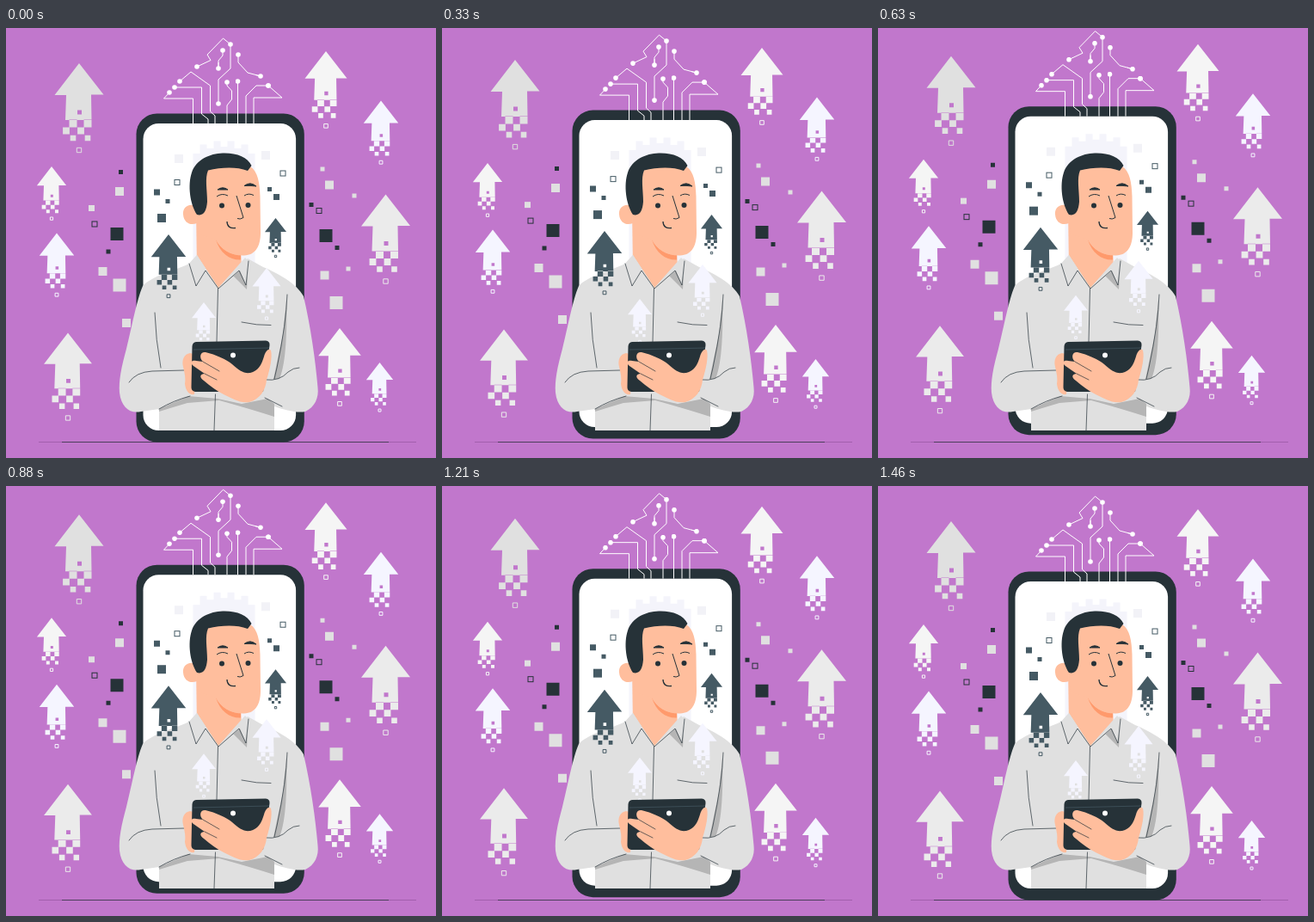
Recreate the animation shown at these times as an HTML page. Size 500 px wide and 500 px high, loop 1.5 s.

```html
<!DOCTYPE html>
<html lang="en">
<head>
<meta charset="utf-8">
<title>Rising arrows</title>
<style>
html, body { margin: 0; width: 100%; height: 100%; overflow: hidden; background: #c177cc; }
svg { display: block; width: 100vw; height: 100vh; }
.thin { fill: none; stroke: #263238; stroke-width: .7; stroke-linecap: round; stroke-linejoin: round; }
.wire { fill: none; stroke: #fff; stroke-linejoin: round; }
.wire path { marker-start: url(#dot); }
.squares { fill: none; stroke-linecap: square; }
.light { stroke: #e0e0e0; }
.dark { stroke: #263238; }
.slate { stroke: #455a64; }
/* zero-length strokes with square caps: the width is the side */
.s5 { stroke-width: 5; }
.s7 { stroke-width: 7; }
.s10 { stroke-width: 10; }
.s15 { stroke-width: 15; }
</style>
</head>
<body>
<svg viewBox="0 0 500 500">
  <defs>
    <marker id="dot" markerUnits="userSpaceOnUse" markerWidth="6" markerHeight="6" refX="3" refY="3">
      <circle cx="3" cy="3" r="2.800" fill="#fff"/>
    </marker>
    <rect id="hollow" x="-3" y="-3" width="6" height="6"/>
    <g id="arrow">
      <path id="arrowShape" fill="currentColor" fill-rule="evenodd"/>
      <rect x="-2.700" y="98.300" width="5.400" height="5.400" fill="none" stroke="currentColor" vector-effect="non-scaling-stroke"/>
    </g>
  </defs>
  <rect width="500" height="500" fill="#c177cc"/>
  <path d="M38 481.5H477" stroke="#8d4f99" stroke-width=".6"/>
  <path d="M65 481.5H445" stroke="#263238" stroke-width=".7"/>

  <g class="float">
    <rect x="151.5" y="99.5" width="195.3" height="382" rx="24" fill="#263238"/>
    <rect x="159.5" y="111" width="177.6" height="357" rx="18" fill="#fff"/>
    <path id="beam" fill="#f4f4fb"/>
    <path class="squares s10" d="M201 152h0M302 148h0" stroke="#f2f2f7"/>
    <g class="wire">
      <path d="M190 75L183.500 82H217.500V111"/>
      <path d="M196 69H227.500V100L235 106V111"/>
      <path d="M202 62L215 51L237.500 67V97L243 102V111"/>
      <path d="M222 45L238 37.500L234 31L252.500 12L261 19"/>
      <path d="M261 19V47L247 60"/>
      <path d="M247 88V60"/>
      <path d="M252 26V32L247 38V47"/>
      <path d="M247 47V40"/>
      <path d="M270 31V40L281 52L296 56"/>
      <path d="M296 56L290 54.500"/>
      <path d="M257 63V67L262.500 73V83L257 90V111"/>
      <path d="M269.500 62V111"/>
      <path d="M305 67H291L279 79V111"/>
      <path d="M305 67L321 81H288V111"/>
    </g>
    <g class="squares light">
      <path class="s5" d="M368 164h0M405 195h0M398 280h0"/>
      <path class="s7" d="M99.500 209.500h0"/>
      <path class="s10" d="M132 190h0M112.500 283h0M140 343h0M376 182.500h0M370.500 287.500h0"/>
      <path class="s15" d="M132 299h0M384 319.500h0"/>
    </g>
    <g class="squares dark">
      <path class="s5" d="M133.500 167.500h0M119 260h0M355 205.500h0M385 255.500h0"/>
      <path class="s15" d="M129 239.500h0M372 241.500h0"/>
      <use href="#hollow" x="103" y="228"/>
      <use href="#hollow" x="364" y="212.500"/>
    </g>
    <g class="squares slate">
      <path class="s5" d="M188 201.500h0M306.500 187.500h0"/>
      <path class="s7" d="M175.500 191h0M314.500 196.500h0"/>
      <path class="s10" d="M181 221h0"/>
      <use href="#hollow" x="199" y="179.500"/>
      <use href="#hollow" x="322" y="169"/>
    </g>
    <g id="back"></g>
  </g>

  <!-- neck and head -->
  <path d="M221 212L222 278L247 304L274 282L273 255Z" fill="#ffbe9d"/>
  <path d="M244 246C250 257 260 264 273 264V269.500C260 270 249 262 244 246Z" fill="#ff9a6c"/>
  <path d="M221 207C212 203 205 209 206 217C207 227 215 230 222 227Z" fill="#ffbe9d"/>
  <path d="M231 166C248 158 272 157 284 161C293 167 295 180 295.500 196L296 238C296 254 290 264 277 264.500C262 265 250 258 244 246L224 240L221 212Z" fill="#ffbe9d"/>
  <path d="M222 217C214 205 211 183 216 168C221 153 237 146 252 145.500C268 145 281 150 285.500 160L281 166C268 161 250 162 235 165.500C231 175 234 188 234 202C233 213 230 219 222 217Z" fill="#263238"/>
  <circle cx="251" cy="206.500" r="3" fill="#263238"/>
  <circle cx="281.500" cy="206" r="3" fill="#263238"/>
  <path d="M246 188Q252 183.500 258 188Q252 188 246 188ZM277 183.500Q284 178 291 184Q284 183 277 183.500Z" fill="#263238" stroke="#263238"/>
  <path d="M245 196Q251 191.500 258 195M277 195Q282 191.500 288 194.500" fill="none" stroke="#263238"/>
  <path d="M268 195L276 220.500Q272 223 269 221.500" fill="none" stroke="#263238"/>
  <path d="M257 225C257 231 261 233.500 267 232.500" fill="none" stroke="#263238" stroke-width="1.300"/>

  <!-- shirt -->
  <path d="M222 264L213 274C194 283 170 288 159 300C152 316 147 345 140 373C134 395 131 410 132 424C134 441 144 449 157 446L178 443V468H312V440C324 444 338 448 348 446C359 441 364 430 362.500 418C360 387 354 346 346 312C338 297 316 285 299 278L281 268L247 303Z" fill="#e0e0e0"/>
  <path d="M178 443L212 428L246 431L274 437L304 431L312 437V452Q284 443 248 433L211 436Q194 441 178 446Z" fill="#b5b5b5"/>
  <path d="M326 316L322 356L311 408H318C326 390 327 348 326 316Z" fill="#b5b5b5"/>
  <path d="M282 272L280 304L264 288L248 302L273 281Z" fill="#b5b5b5"/>
  <path d="M222 264L213 274L221 300L232 282L247 303L272 282L279 299L283 272L278 267L247 302Z" fill="#e0e0e0"/>
  <g class="thin">
    <path d="M213 274L221 300L232 282L247 303L271 282L279 299L282 271"/>
    <path d="M246.500 303L245 365M243.500 426L242 468"/>
    <path d="M274 342Q292 346 308 345.500"/>
    <path d="M173 331Q174 362 180 395M327 310Q326 343 315 395L312 408"/>
    <path d="M143 412Q151 400 170 399L207 398M178 443Q195 433 214 428M302 409Q318 411 328 400Q334 395 341 395M301 430L321 440"/>
  </g>

  <g class="float" id="front"></g>

  <!-- tablet and hands -->
  <path d="M214 378C207 379 204 386 206 394C208 402 209 408 208 414C209 422 213 427 219 426L222 380Z" fill="#ffbe9d"/>
  <path d="M221 365L302 363.500Q307 364 306.500 369L299 423L220 423Q215 422 215.500 417L216.500 370Q217 365.500 221 365Z" fill="#263238"/>
  <path d="M218 374L306 372" stroke="#455a64" stroke-width=".7"/>
  <circle cx="264" cy="380.500" r="3" fill="#fff"/>
  <path d="M300 382C302 375 306 372 308 375C310 382 307 397 303 409C302 421 295 432 283 435C272 437 262 430 253 426C245 422 237 416 230 410C224 406 226 402 231 402L218 393C213 389 216 386 221 387L229 388C224 383 226 376 232 377C244 380 256 385 263 391C271 398 276 402 284 401C293 399 297 392 300 382Z" fill="#ffbe9d"/>
  <path class="thin" d="M229 388L248 399M231 402L245 409"/>
</svg>

<script>
const NS = 'http://www.w3.org/2000/svg';
const $ = id => document.getElementById(id);
const box = (x, y, w, h = w) => `M${x} ${y}h${w}v${h}h${-w}z`;

// Below the stem, staggered pairs of squares shrink row by row.
function arrowPath() {
  let d = 'M0 0L28.500 36.500H14L14.500 66H-16L-15 37H-28.500Z' + box(-2, 54.5, 5);
  for (let row = 0; row < 3; row++) {
    const size = 9 - 1.2 * row;
    for (const x of [-7, 10])
      d += box(x - row % 2 * 8 - size / 2, 70 + 8.5 * row - size / 2, size);
  }
  return d;
}

// Light column whose top edge rises and falls in square teeth.
function beamPath() {
  let d = 'M217.500 300';
  for (let i = 0; i < 9; i++)
    d += `V${138 + (i - 4) ** 2 / 2 - i % 2 * 7}h8`;
  return d + 'V300z';
}

function arrow(layer, color, x, y, scale) {
  const use = document.createElementNS(NS, 'use');
  use.setAttribute('href', '#arrow');
  use.setAttribute('color', color);
  use.setAttribute('transform', `translate(${x} ${y}) scale(${scale})`);
  $(layer).appendChild(use);
}

$('arrowShape').setAttribute('d', arrowPath());
$('beam').setAttribute('d', beamPath());

const GREY = '#ebebeb', WHITE = '#f5f5f5', PALE = '#f5f5ff', SLATE = '#455a64';
arrow('back', '#e0e0e0', 85, 41, 1);
arrow('back', GREY, 441.5, 193.5, 1);
arrow('back', GREY, 72, 354.5, .98);
arrow('back', WHITE, 372, 27, .86);
arrow('back', WHITE, 388, 349, .87);
arrow('back', WHITE, 53, 161, .6);
arrow('back', PALE, 436, 84.5, .71);
arrow('back', PALE, 59, 238.5, .71);
arrow('back', PALE, 434.5, 389, .55);
arrow('back', SLATE, 313.5, 221, .44);
arrow('front', SLATE, 189, 240, .71);
arrow('front', PALE, 230, 319, .49);
arrow('front', PALE, 303, 279, .58);

const LOOP = 1500, STEPS = 36, RISE = 10;
const floaters = document.querySelectorAll('.float');

// Straight rise and fall, stepped at 24 pictures a second.
function draw(t) {
  const step = Math.floor((t % LOOP + 2) / LOOP * STEPS) % STEPS;
  const phase = (step + .5) / STEPS;
  const lift = RISE * (1 - Math.abs(1 - 2 * phase)) - RISE / STEPS;
  floaters.forEach(g => g.setAttribute('transform', `translate(0 ${-lift.toFixed(3)})`));
}

let start;
function tick(now) {
  start ??= now;
  draw(now - start);
  requestAnimationFrame(tick);
}
draw(0);
requestAnimationFrame(tick);
</script>
</body>
</html>
```
